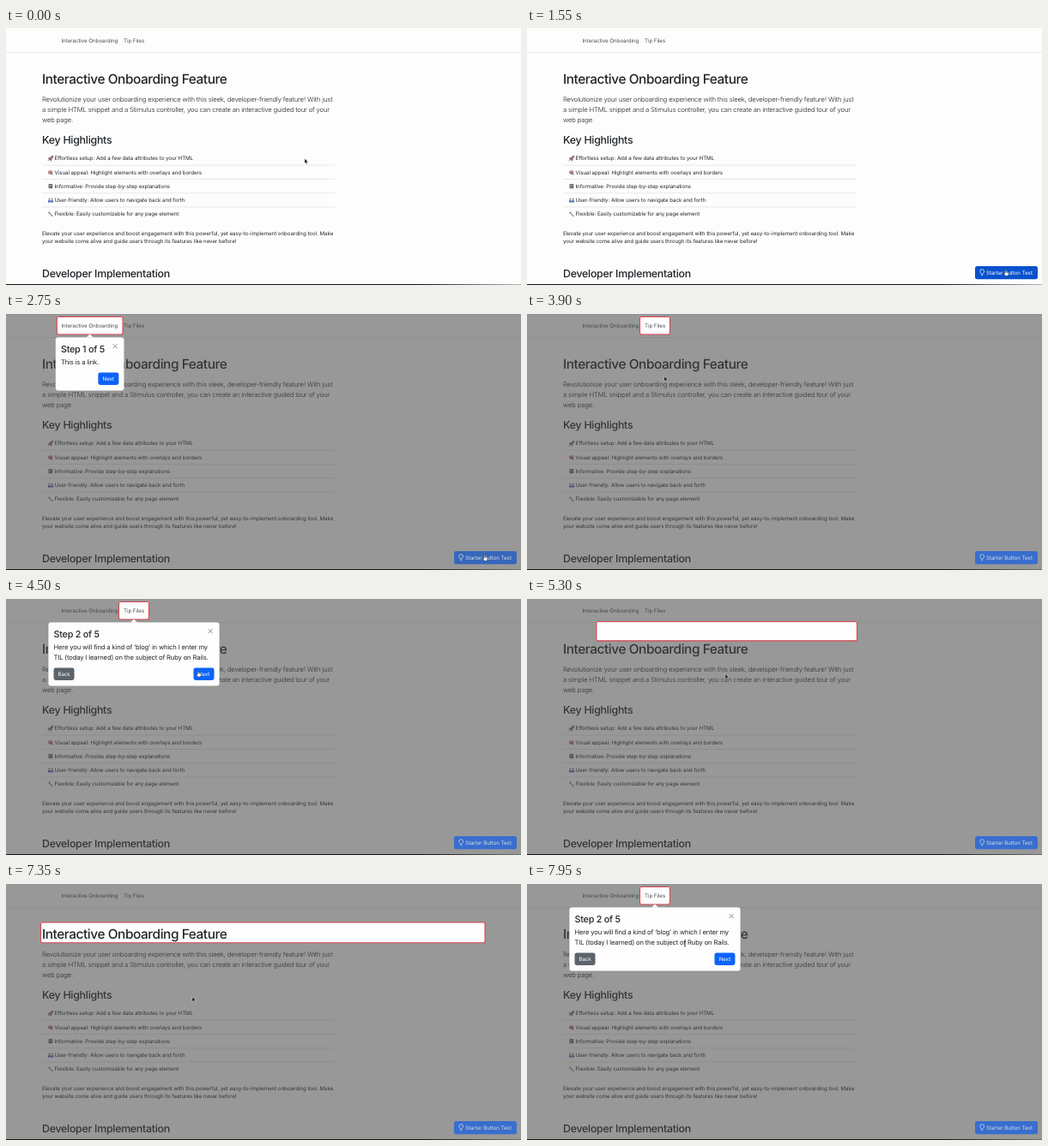
Write an HTML page that moves like this. It is 600 px wide and 300 px high and loops after 8 s.

```html
<!DOCTYPE html>
<html lang="en">
<head>
<meta charset="utf-8">
<title>Interactive Onboarding</title>
<style>
  html, body { margin: 0; width: 100%; height: 100%; overflow: hidden; background: #fdfdfd; }
  svg { display: block; width: 600px; height: 300px; }
  text { font: 400 6.2px Inter, sans-serif; letter-spacing: -.008em; fill: #212529; white-space: pre; text-rendering: geometricPrecision; }
  .h1 { font-size: 15.4px; font-weight: 500; letter-spacing: -.028em; }
  .h2 { font-size: 12.4px; font-weight: 500; letter-spacing: -.022em; }
  .h3 { font-size: 10.8px; font-weight: 500; letter-spacing: -.024em; }
  .lead { font-size: 7.7px; font-weight: 300; letter-spacing: -.02em; }
  .body { font-size: 7.65px; letter-spacing: -.021em; }
  .nav { fill: #484c50; }
  .btn { fill: #fff; text-anchor: middle; }
  .line { stroke: #e2e4e6; stroke-width: .8; }
</style>
</head>
<body>
<svg viewBox="0 0 600 300">
  <rect width="600" height="300" fill="#fdfdfd"/>
  <g id="page"></g>
  <g id="icons" stroke-linecap="round">
    <path d="M49 155l1.5-1.3M50 153l2 1.2 2.6-3.5.3-1.4-1.5.4z" stroke="#5b5360" stroke-width=".7" fill="#8b7d8a"/>
    <path d="M49.2 152.3l1.6-.4M52.6 155l.3-1.5" stroke="#c2474d" stroke-width="1"/>
    <ellipse cx="51.8" cy="168.4" rx="2.7" ry="2.2" fill="#b0776e"/>
    <path d="M50.4 168h.1M52 167.2h.1M53.5 168.2h.1" stroke="#e9c9d8" stroke-width=".9"/>
    <path d="M52 170l2.2 1" stroke="#4b5a86" stroke-width=".9"/>
    <rect x="49.5" y="182" width="4.800" height="5.200" rx="1" fill="#67646b"/>
    <path d="M50.5 183.6h2.6M50.5 185.2h2" stroke="#c9c4c6" stroke-width=".6"/>
    <path d="M49 203.6v-2q1.5-1.2 2.9 0v2zM52.2 203.6v-2q1.5-1.2 2.9 0v2z" fill="#4468ac"/>
    <path d="M50.4 199.6h.1M53.6 199.6h.1" stroke="#6b6470" stroke-width="1.8"/>
    <path d="M50.6 216.1l3.6 3.6" stroke="#777c82" stroke-width="1.1"/>
    <path d="M49.3 215.6q1.5 1.6 1.6-.9" stroke="#777c82" stroke-width=".9" fill="none"/>
  </g>
  <path id="shade" fill="#444" fill-rule="evenodd"/>
  <rect id="ring" rx="2" fill="none" stroke="#dc4450" stroke-width="1.1"/>
  <g id="starter">
    <rect id="face" x="522" y="278" width="73" height="15.3" rx="2.4"/>
    <path d="M529.3 287.2c0-1-1.5-1.6-1.5-3.1a2.4 2.4 0 0 1 4.8 0c0 1.500-1.500 2.100-1.500 3.100zM529.3 288.600h1.800" fill="none" stroke="#fff" stroke-width=".7"/>
    <text x="535" y="288" style="fill:#fff">Starter Button Text</text>
  </g>
  <g id="pops"></g>
  <linearGradient id="edge">
    <stop offset=".8" stop-color="#111"/><stop offset="1" stop-color="#111" stop-opacity=".3"/>
  </linearGradient>
  <rect y="299" width="600" height="1" fill="url(#edge)"/>
  <g id="cursor" stroke-linejoin="round">
    <path d="M0 0v5.600l1.300-1.200 .9 2 .9-.4-.9-2h1.800z" fill="#000" stroke="#fff" stroke-width=".4"/>
    <path d="M-.5-1.500q.6-.8 1.100 0v2l2.400.6q.7.3.5 1.200l-.6 2.500h-3.100l-2-2.900q.2-.8 1.100-.2l.6.5z" fill="#fff" stroke="#222" stroke-width=".5"/>
    <path d="M-1-3q1 0 1 .8 0-.8 1-.8M0-2.200v4.400M-1 3q1 0 1-.8 0 .8 1 .8" fill="none" stroke="#111" stroke-width=".7"/>
  </g>
</svg>
<script>
const LOOP = 8000, SLIDE = 450;
const $ = id => document.getElementById(id);
const clamp = v => Math.max(0, Math.min(1, v));
const ramp = (t, from, to) => clamp((t - from) / (to - from));
const ease = p => p * p * (3 - 2 * p);
const mix = (a, b, p) => a + (b - a) * p;
const text = (x, y, s, cls = '') => `<text x="${x}" y="${y}" class="${cls}">${s}</text>`;
const line = (x1, x2, y) => `<path class="line" d="M${x1} ${y}H${x2}"/>`;

const perks = [
  'Effortless setup: Add a few data attributes to your HTML',
  'Visual appeal: Highlight elements with overlays and borders',
  'Informative: Provide step-by-step explanations',
  'User-friendly: Allow users to navigate back and forth',
  'Flexible: Easily customizable for any page element'
];
const rowY = i => 154.4 + i * 16.25;

$('page').innerHTML =
  line(0, 600, 28.7) +
  text(64.5, 17.2, 'Interactive Onboarding', 'nav') +
  text(137, 17.2, 'Tip Files', 'nav') +
  text(42, 64.5, 'Interactive Onboarding Feature', 'h1') +
  ['Revolutionize your user onboarding experience with this sleek, developer-friendly feature! With just',
   'a simple HTML snippet and a Stimulus controller, you can create an interactive guided tour of your',
   'web page.'].map((s, i) => text(42, 86 + 12 * i, s, 'lead')).join('') +
  text(42, 134.8, 'Key Highlights', 'h2') +
  perks.map((s, i) => text(56.5, rowY(i), s) + (i < 4 ? line(42, 383, rowY(i) + 5.8) : '')).join('') +
  text(42, 241.8, 'Elevate your user experience and boost engagement with this powerful, yet easy-to-implement onboarding tool. Make') +
  text(42, 251.4, 'your website come alive and guide users through its features like never before!') +
  text(42, 291.3, 'Developer Implementation', 'h2');

// box: left, top, right, bottom of the highlighted element
const steps = [
  { box: [59.3, 4.5, 136, 25], width: 80, lines: ['This is a link.'] },
  { box: [131.5, 4.5, 166.5, 25], width: 199.5,
    lines: ['Here you will find a kind of ‘blog’ in which I enter my',
            'TIL (today I learned) on the subject of Ruby on Rails.'] },
  { box: [40, 46.2, 560.5, 70], width: 199.5,
    lines: ['This is the intro of the feature page (or really just a', 'dummy step).'] }
];

function button(x, y, label, color) {
  return `<rect x="${x}" y="${y}" width="24" height="14.5" rx="2.4" fill="${color}"/>` +
    text(x + 12, y + 9.5, label, 'btn');
}

function popover(step, i) {
  const [l, , r, b] = step.box, mid = (l + r) / 2, n = step.lines.length;
  const x = step.left = mid - step.width / 2, y = step.top = b + 3.2;
  const right = x + step.width, foot = y + 29.3 + 12 * n;
  return `<g><rect x="${x}" y="${y}" width="${step.width}" height="${50.5 + 12 * n}" rx="3.2" fill="#fdfdfd" stroke="#000" stroke-opacity=".2" stroke-width=".5"/>
    <path d="M${mid - 4} ${y + .3}l4-3.700 4 3.700z" fill="#fdfdfd"/>
    <path d="M${right - 13} ${y + 8}l5 5m0-5l-5 5" stroke="#777" stroke-width=".8"/>` +
    text(x + 6.3, y + 17.3, `Step ${i + 1} of 5`, 'h3') +
    step.lines.map((s, k) => text(x + 6.3, y + 31.6 + 12 * k, s, 'body')).join('') +
    (i ? button(x + 6.3, foot, 'Back', '#5c636a') : '') +
    button(right - 30.3, foot, 'Next', '#0d63f8') + '</g>';
}
$('pops').innerHTML = steps.map(popover).join('');
const pops = [...$('pops').children];

// time, step shown from then on
const visits = [[1800, 0], [3440, 1], [5060, 2], [7330, 1]];

// time, x, y
const track = [
  [0, 348, 152.5], [850, 348, 152.5], [1400, 557.5, 284.5], [3020, 557.5, 284.5],
  [3350, 120, 76], [3600, 122, 76], [3900, 160, 74], [4650, 231, 88.8], [5350, 231, 88.8],
  [5850, 184, 100.5], [6300, 205, 128], [6650, 217, 133], [7430, 217, 133], [7920, 184, 71], [LOOP, 184, 71]
];

function pointer(t) {
  const i = track.findIndex(k => k[0] > t), a = track[i - 1], b = track[i];
  const p = ease(ramp(t, a[0], b[0]));
  return [mix(a[1], b[1], p), mix(a[2], b[2], p)];
}

function cursorKind(x, y, step) {
  const inside = (l, t, w, h) => x >= l && x <= l + w && y >= t && y <= t + h;
  if (inside(522, 278, 73, 15)) return 1;
  if (!step) return 0;
  const { left, top, width, lines } = step, foot = top + 29.3 + 12 * lines.length;
  if (inside(left + 6, foot, 24, 14.5) || inside(left + width - 30, foot, 24, 14.5)) return 1;
  return inside(left + 6, top + 24, width - 12, 12 * lines.length) ? 2 : 0;
}

function draw(t) {
  const now = visits.findLastIndex(v => v[0] <= t);
  const dim = ramp(t, 1800, 2200);
  let open = null;
  pops.forEach(p => p.setAttribute('opacity', 0));

  $('ring').style.display = now < 0 ? 'none' : '';
  if (now >= 0) {
    const [start, id] = visits[now];
    const to = steps[id].box, from = now ? steps[visits[now - 1][1]].box : to;
    const p = ease(ramp(t, start, start + SLIDE));
    const [l, top, r, b] = to.map((v, i) => mix(from[i], v, p));
    const ring = { x: l, y: top, width: r - l, height: b - top };
    for (const k in ring) $('ring').setAttribute(k, ring[k]);
    $('shade').setAttribute('d', `M0 1H600V300H0zM${l} ${top}H${r}V${b}H${l}z`);
    const shown = ramp(t, start + 500, start + 600);
    pops[id].setAttribute('opacity', shown);
    if (shown > .5) open = steps[id];
  }
  $('shade').setAttribute('fill-opacity', .54 * dim);

  const [x, y] = pointer(t), kind = cursorKind(x, y, open);
  $('cursor').setAttribute('transform', `translate(${x} ${y})`);
  [...$('cursor').children].forEach((c, i) => c.style.display = i === kind ? '' : 'none');

  const hover = x > 522 && y > 278;
  $('starter').setAttribute('transform', `translate(${85 * (1 - ease(ramp(t, 600, 1000)))} 0)`);
  $('starter').setAttribute('opacity', mix(1, .68, dim));
  $('face').setAttribute('fill', hover ? '#0a51cd' : '#0b5bea');
}

function tick(time) {
  draw(time % LOOP);
  requestAnimationFrame(tick);
}
draw(0);
requestAnimationFrame(tick);
</script>
</body>
</html>
```
